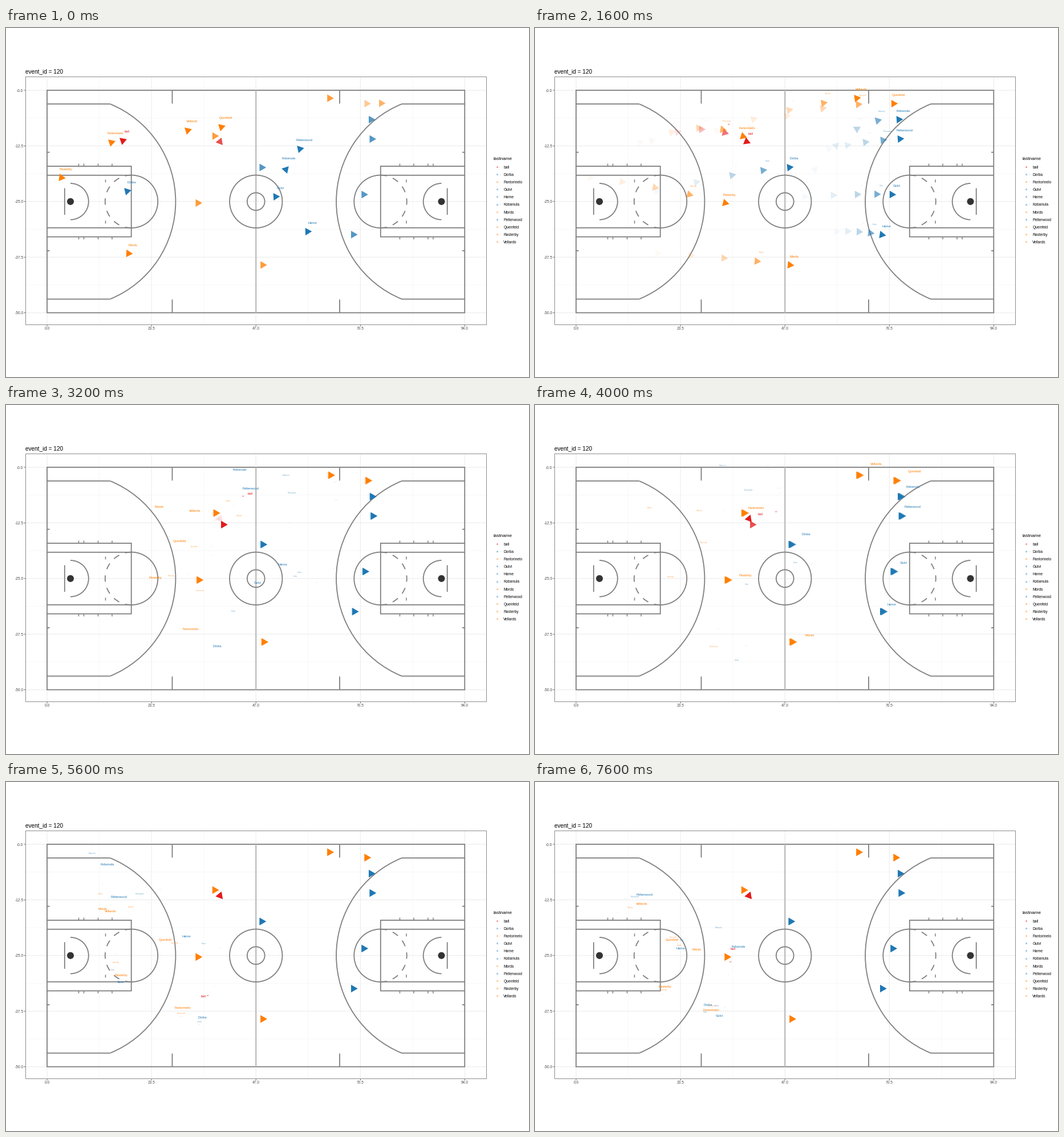
A matplotlib script for the animation above (8000 ms loop, 917x611 px).

```python
import numpy as np
import matplotlib.pyplot as plt
from matplotlib.animation import FuncAnimation
from matplotlib.patches import Arc, Circle, Polygon, Rectangle

W, H, DPI = 917, 611, 100
FRAMES, INTERVAL = 20, 400
RED, BLUE, ORANGE = "#E31A1C", "#1F78B4", "#FF7F00"
LINE, LINE_WIDTH = "#7F7F7F", 1.8
MID_X, MID_Y, FOOT = 437.75, 303.3, 7.79

WAKE_ALPHA = (1, 0.6, 0.3, 0.12, 0.04)
WAKE_SIZE = (1, 0.52, 0.23)
LABEL_SIZE, MARKER_RADIUS = 5.8, 7.6
STOP, FLASH = 4, 10                      # markers halt; labels flash back
RUN_KEYS = np.array([0, 2, STOP])
BACK_KEYS = np.array([6, 8, 12, 16, 19])

plt.rcParams.update({"font.family": "Liberation Sans", "path.snap": False})
fig = plt.figure(figsize=(W / DPI, H / DPI), dpi=DPI, facecolor="white")
ax = fig.add_axes([0, 0, 1, 1])
ax.set(xlim=(-0.5, W - 0.5), ylim=(H - 0.5, -0.5))
ax.axis("off")


def pts(px):
    return px * 72 / DPI


def line(x0, y0, x1, y1, color=LINE, width=LINE_WIDTH, z=2):
    ax.plot([x0, x1], [y0, y1], color=color, lw=pts(width), zorder=z,
            solid_capstyle="butt")


def write(x, y, text, size, color="black", ha="left", **kw):
    """Place text with its capitals centred on y."""
    return ax.text(x, y + 0.36 * size, text, fontsize=pts(size), color=color,
                   ha=ha, va="baseline", **kw)


def spline(keys, points, t):
    """Cubic Hermite curve through points at keys."""
    slope = np.gradient(points, keys, axis=0)
    i = min(np.searchsorted(keys, t, "right") - 1, len(keys) - 2)
    h = keys[i + 1] - keys[i]
    s = (t - keys[i]) / h
    return ((1 + 2 * s) * (1 - s) ** 2 * points[i]
            + s * (1 - s) ** 2 * h * slope[i]
            + s * s * (3 - 2 * s) * points[i + 1]
            + s * s * (s - 1) * h * slope[i + 1])


class Player:
    """A marker that runs up court and a label that later runs back alone."""

    def __init__(self, name, color, run, back, drift=(2, 0), before=0.06):
        self.name, self.color = name, color
        curve = np.polyfit(RUN_KEYS, np.array(run, float), 2)
        steps = np.arange(STOP + 1)
        self.run = np.vander(steps, 3) @ curve
        pace = np.gradient(self.run, axis=0)
        self.angles = np.arctan2(pace[:, 1], pace[:, 0])
        self.back = np.array(back, float)
        self.drift = np.array(drift)
        self.rest_angle = np.arctan2(drift[1], drift[0])
        self.before = self.beyond(before)

    def beyond(self, share):
        return self.run[-1] + share * (self.run[-1] - self.run[-2])

    def marker(self, k):
        if 0 <= k <= STOP:
            return self.run[k], self.angles[k]
        if 6 <= k < FLASH:
            return self.beyond(0.06) + self.drift, 0
        spot = self.before if k == -1 else self.beyond(0.06)
        return spot, self.rest_angle

    def label(self, k):
        if k >= BACK_KEYS[0] and k != FLASH:
            return spline(BACK_KEYS, self.back, k)
        spot = self.beyond(0.45) if k == FLASH else self.marker(k)[0]
        angle = self.angles[min(k, STOP)]
        return spot + [6.5, -15.5 + 7 * np.sin(angle)]


players = [
    Player("ball", RED, [(205, 198), (293, 177), (371, 197)],
           [(398, 175), (428, 154), (364, 357), (337, 355), (347, 291)],
           drift=(9, 11)),
    Player("Dorba", BLUE, [(213, 286), (346, 258), (447, 244)],
           [(430, 290), (370, 421), (339, 424), (344, 397), (303, 389)]),
    Player("Fantorinelo", ORANGE, [(185, 201), (288, 175), (365, 188)],
           [(360, 247), (323, 391), (307, 410), (312, 381), (308, 398)]),
    Player("Gulvi", BLUE, [(474, 295), (566, 291), (627, 291)],
           [(574, 286), (441, 310), (195, 313), (250, 388), (323, 408)]),
    Player("Harne", BLUE, [(530, 356), (569, 356), (609, 361)],
           [(545, 310), (485, 278), (376, 290), (268, 254), (255, 290)]),
    Player("Kobanula", BLUE, [(489, 248), (564, 178), (639, 160)],
           [(576, 134), (409, 112), (151, 111), (254, 193), (356, 287)]),
    Player("Mords", ORANGE, [(216, 394), (332, 402), (448, 414)],
           [(529, 156), (268, 177), (169, 178), (198, 268), (283, 292)]),
    Player("Pelterwood", BLUE, [(516, 212), (580, 200), (641, 194)],
           [(580, 166), (428, 145), (270, 188), (154, 206), (191, 196)]),
    Player("Quenfeld", ORANGE, [(378, 174), (505, 141), (630, 132)],
           [(360, 262), (304, 237), (307, 282), (249, 265), (240, 275)],
           before=0.47),
    Player("Rasterby", ORANGE, [(98, 261), (211, 278), (334, 305)],
           [(320, 295), (261, 301), (192, 300), (220, 371), (227, 357)]),
    Player("Vellards", ORANGE, [(319, 180), (446, 144), (565, 123)],
           [(497, 205), (331, 184), (249, 211), (138, 232), (187, 212)]),
]


def draw_axes():
    for i in range(9):
        x, y = 71.5 + 91.56 * i, 108.5 + 48.7 * i
        color, width = ("#F3F3F3", 0.6) if i % 2 else ("#EBEBEB", 1)
        line(x, 85, x, 519, color, width, 0)
        line(34, y, 842, y, color, width, 0)
        if i % 2 == 0:
            line(x, 519, x, 522, "#444444", 0.8)
            line(31, y, 34, y, "#444444", 0.8)
            write(x, 525.3, f"{11.75 * i:.1f}", 6.6, "#4D4D4D", "center")
            write(30, y + 0.2, f"{-6.25 * i:.1f}", 6.6, "#4D4D4D", "right")
    ax.add_patch(Rectangle((34, 85), 808, 434, fill=False, ec="#8C8C8C",
                           lw=pts(1), zorder=3))
    write(33.2, 75.2, "event_id = 120", 10)


def arc(x, r, start, end):
    ax.add_patch(Arc((x, MID_Y), 2 * r, 2 * r, theta1=start, theta2=end,
                     ec=LINE, lw=pts(LINE_WIDTH), zorder=2))


def draw_half(flip):
    def mx(x):
        return 2 * MID_X - x if flip else x

    def seg(x0, y0, x1, y1, width=LINE_WIDTH):
        line(mx(x0), y0, mx(x1), y1, width=width)

    def bow(x, r, start, end):
        if flip:
            start, end = 180 - end, 180 - start
        arc(mx(x), r, start, end)

    hoop, reach, wing = 112.5, 184.4, 170.8
    corner = np.arcsin(wing / reach)
    for side in (-1, 1):
        def sy(d):
            return MID_Y + side * d
        seg(71.5, sy(wing), hoop + reach * np.cos(corner), sy(wing))
        seg(291, sy(194.8), 291, sy(171.5))
        seg(71.5, sy(61.8), 220, sy(61.8))
        seg(71.5, sy(46), 219, sy(46))
        seg(71.5, sy(86.2), 76, sy(86.2))
        seg(174, sy(33.5), 174, sy(38.5), 1.5)
        for x in (127, 136, 161, 185.5):
            seg(x, sy(61.8), x, sy(66.3), 1.5)
    seg(219.2, MID_Y - 61.8, 219.2, MID_Y + 61.8)
    seg(102.3, 280, 102.3, 326.5)
    bow(hoop, reach, -np.degrees(corner), np.degrees(corner))
    bow(hoop, 31.8, -90, 90)
    bow(219.5, 46.2, -90, 90)
    dash = 180 / 13
    for i in range(0, 13, 2):
        bow(219.5, 46.2, 90 + i * dash, 90 + (i + 1) * dash)
    ax.add_patch(Circle((mx(hoop), MID_Y), 5.6, fc="#333333", ec="#333333",
                        lw=pts(0.8), zorder=3))


def draw_court():
    ax.add_patch(Rectangle((71.5, 108.5), 94 * FOOT, 50 * FOOT, fill=False,
                           ec=LINE, lw=pts(LINE_WIDTH), zorder=2))
    line(MID_X, 108.5, MID_X, 498, "#BEBEBE", 2.4)
    for radius in (46.2, 15.4):
        arc(MID_X, radius, 0, 360)
    draw_half(False)
    draw_half(True)


def draw_legend():
    write(854, 227.8, "lastname", 8.2)
    for i, p in enumerate(players):
        y = 243 + 13.12 * i
        write(861, y - 0.4, "a", 5.2, p.color, "center", alpha=0.7,
              weight="bold")
        if i in (1, 2, 5, 8, 9):
            write(866, y - 0.6, "-", 5, p.color, "center", alpha=0.7)
        write(871.7, y, p.name, 6.6)


def triangle(center, angle, color, alpha, z):
    a = angle + np.radians([0, 120, 240])
    shape = MARKER_RADIUS * np.column_stack([np.cos(a), np.sin(a)])
    shape += center - (shape.min(0) + shape.max(0)) / 2
    return ax.add_patch(Polygon(shape, fc=color, ec="none", alpha=alpha,
                                zorder=z))


draw_axes()
draw_court()
draw_legend()
live = []


def update(k):
    while live:
        live.pop().remove()
    for age, alpha in enumerate(WAKE_ALPHA):
        for p in players:
            spot, angle = p.marker(k - age)
            live.append(triangle(spot, angle, p.color, alpha, 10 - age))
            if age < len(WAKE_SIZE) and k >= age:
                x, y = p.label(k - age)
                live.append(write(x, y, p.name, LABEL_SIZE * WAKE_SIZE[age],
                                  p.color, "center", alpha=alpha,
                                  zorder=20 - age))
    return live


anim = FuncAnimation(fig, update, frames=FRAMES, interval=INTERVAL,
                     init_func=lambda: live, repeat=True, repeat_delay=0,
                     blit=False)
plt.show()
```
